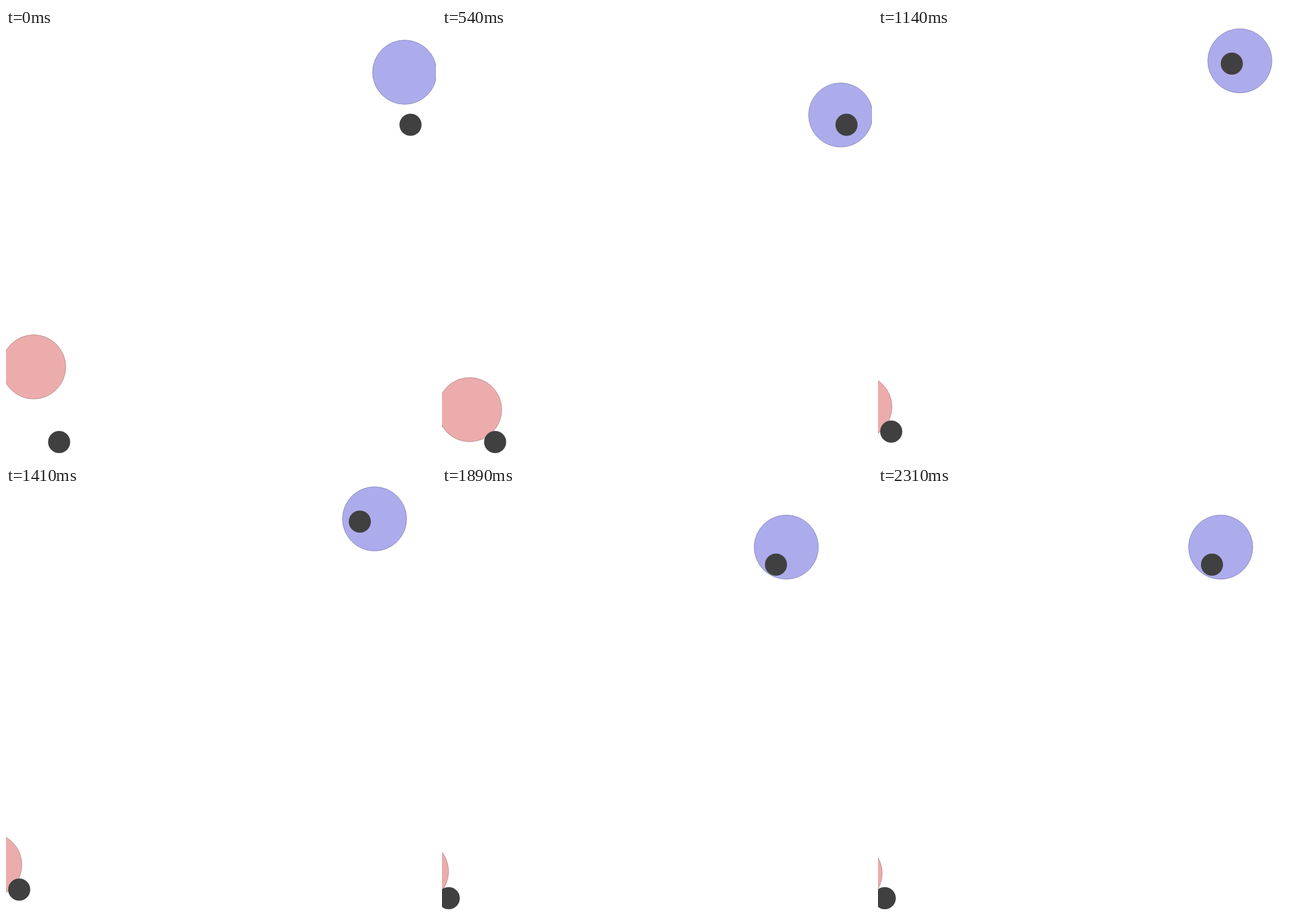
Recreate the animation shown at these times as an HTML page. Size 700 by 700 pixels, loop 2340 ms.

```html
<!DOCTYPE html>
<html lang="en">
<head>
<meta charset="utf-8">
<title>Two agents</title>
<style>
  html, body { margin: 0; width: 100%; height: 100%; overflow: hidden; background: #fff; }
  svg { display: block; width: 100vw; height: 100vh; }
  .agent { stroke-width: 1; }
  .mark { fill: #404040; }
</style>
</head>
<body>
<svg viewBox="0 0 700 700">
  <circle id="red" class="agent" r="52.2" fill="#ecacac" stroke="#bd9090"/>
  <circle id="blue" class="agent" r="52.2" fill="#acacec" stroke="#8e8ec2"/>
  <circle id="markA" class="mark" r="18"/>
  <circle id="markB" class="mark" r="18"/>
</svg>
<script>
const STEP = 30, STEPS = 26, LOOP = 2340;
const KICK = 17.5, DRAG = 0.75;

// L R U D push by one unit, r is a weak push right, anything else coasts
const PUSH = { L: [-1, 0], R: [1, 0], U: [0, -1], D: [0, 1], r: [0.24, 0] };

const episodes = [
  {
    marks: [[658.5, 157.5], [86.5, 674]],
    blue: { at: [649, 72], moves: "D" },
    red: { at: [45, 551.7], moves: "D" }
  },
  {
    marks: [[576, 58], [21.5, 657]],
    blue: { at: [560, 53.5], moves: "RL".repeat(13) },
    red: { at: [143, 616.8], moves: "LL-" + "LR".repeat(11) }
  },
  {
    marks: [[543.7, 128], [11, 671]],
    blue: { at: [651, 99.5], moves: "LLr" + "RL".repeat(11) },
    red: { at: [24.5, 560.4], moves: "DL" }
  }
];

// Damped motion: each step loses a quarter of the speed, then adds the push
function walk({ at, moves }, steps) {
  let [x, y] = at, vx = 0, vy = 0;
  for (let i = 0; i < steps; i++) {
    const [px, py] = PUSH[moves[i]] || [0, 0];
    vx = vx * DRAG + px * KICK;
    vy = vy * DRAG + py * KICK;
    x += vx;
    y += vy;
  }
  return [x, y];
}

function place(id, [x, y]) {
  const dot = document.getElementById(id);
  dot.setAttribute("cx", x.toFixed(2));
  dot.setAttribute("cy", y.toFixed(2));
}

function draw(ms) {
  const tick = Math.floor((ms % LOOP) / STEP);
  const ep = episodes[Math.floor(tick / STEPS)];
  const step = tick % STEPS;
  place("red", walk(ep.red, step));
  place("blue", walk(ep.blue, step));
  place("markA", ep.marks[0]);
  place("markB", ep.marks[1]);
}

const start = performance.now();
function loop() {
  draw(performance.now() - start);
  requestAnimationFrame(loop);
}
loop();
</script>
</body>
</html>
```
